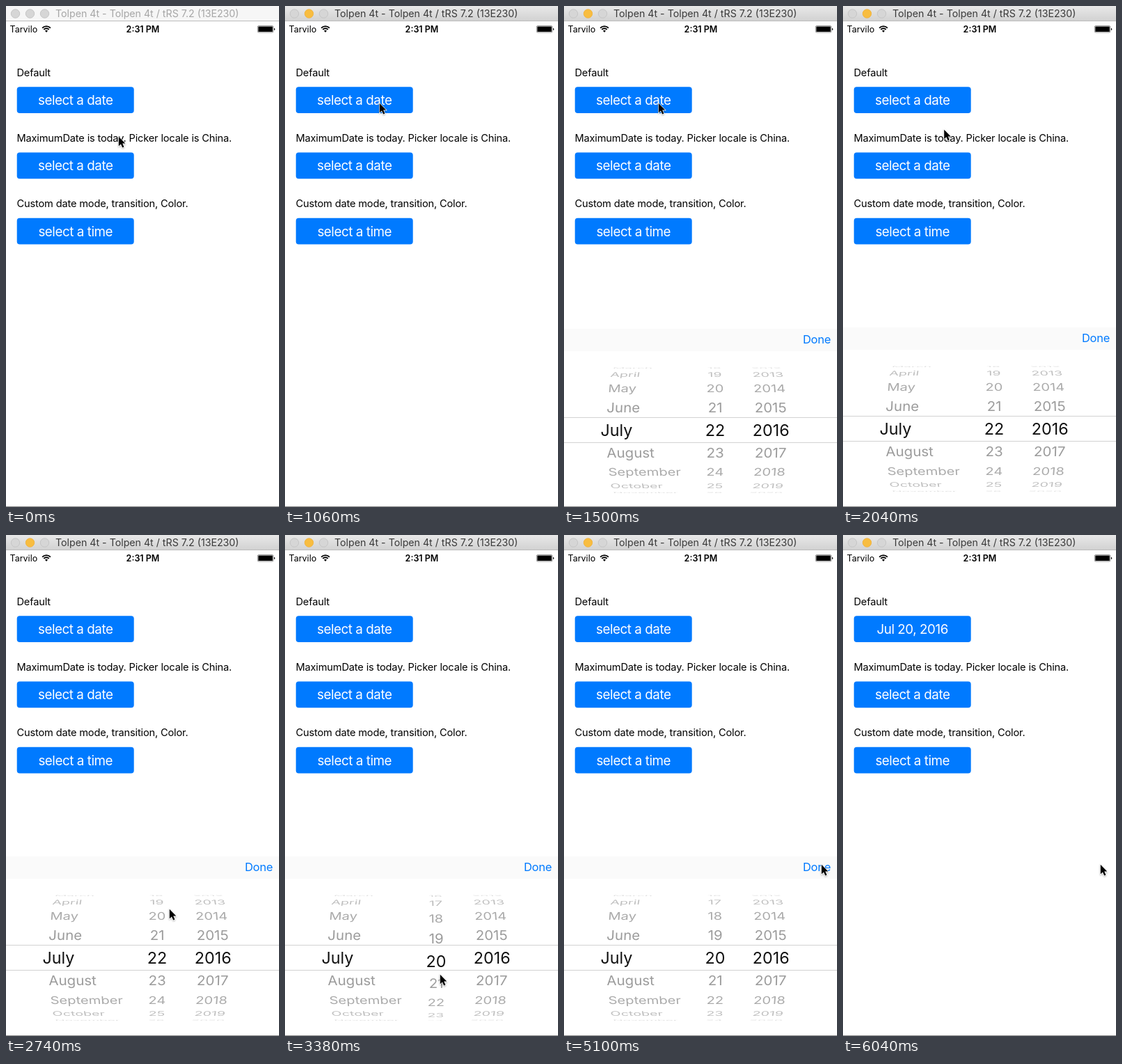
These frames come from a looping animation (392 by 720 pixels, 6060 ms). An HTML page:

```html
<!DOCTYPE html>
<html lang="en">
<head>
<meta charset="utf-8">
<title>Date picker demo</title>
<style>
  html, body { margin: 0; width: 100%; height: 100%; overflow: hidden; background: #fff; }
  svg { display: block; width: 392px; height: 720px; font-family: Inter, Roboto, "Liberation Sans", sans-serif; }
  .label { font-size: 14.6px; letter-spacing: -.16px; }
  .button rect { fill: #007aff; }
  .button text { fill: #fff; font-size: 18.8px; letter-spacing: -.45px; text-anchor: middle; }
  .status { font-size: 12.5px; }
  .dot { stroke-width: 1; fill: #d6d6d6; stroke: #c6c6c6; }
  #title { font-size: 14.2px; fill: #a6a6a6; }
  .active #title { fill: #3a3a3a; }
  #bar { fill: #f6f6f6; }
  .active #bar { fill: url(#barFill); }
  .active #minimize { fill: #f8bd40; stroke: #f0b543; }
  .rim { font-size: 20.6px; }
  .lens { font-size: 23.3px; fill: #111; }
</style>
</head>
<body>
<svg id="stage" viewBox="0 0 392 720">
  <defs>
    <linearGradient id="barFill" x2="0" y2="1">
      <stop offset="0" stop-color="#e8e8e8"/>
      <stop offset="1" stop-color="#d1d1d1"/>
    </linearGradient>
    <clipPath id="rimClip"><path d="M0 516H392V589.5H0zM0 625.5H392V700H0z"/></clipPath>
    <clipPath id="lensClip"><path d="M0 589.5H392V625.5H0z"/></clipPath>
    <filter id="shade" x="-50%" y="-50%" width="200%" height="200%">
      <feDropShadow dx="0" dy="1.2" stdDeviation="1" flood-opacity=".35"/>
    </filter>
  </defs>
  <rect width="392" height="720" fill="#fff"/>

  <g id="page"></g>

  <g id="picker">
    <rect y="462" width="392" height="258" fill="#fff"/>
    <rect y="462" width="392" height="32" fill="#fafafa"/>
    <text x="383" y="483.2" text-anchor="end" font-size="16.4" letter-spacing="-.2" fill="#007aff">Done</text>
    <g id="rim" class="rim" clip-path="url(#rimClip)"></g>
    <g id="lens" class="lens" clip-path="url(#lensClip)"></g>
    <path d="M0 589.5H392M0 625.5H392" stroke="#d2d2d2"/>
  </g>

  <g class="status">
    <text x="5.5" y="37.5">Tarvilo</text>
    <text x="196.5" y="37.5" text-anchor="middle" font-weight="600">2:31 PM</text>
    <g fill="none" stroke="#000" stroke-width="1.9">
      <path d="M52.1 31.6A8.2 8.2 0 0 1 63.9 31.6M54.3 33.9A5 5 0 0 1 61.7 33.9"/>
      <path d="M58 38L56 35.6A3 3 0 0 1 60 35.6z" fill="#000" stroke="none"/>
    </g>
    <rect x="361.3" y="28.5" width="22.5" height="9.5" rx="1.6" fill="none" stroke="#000" stroke-width=".6" opacity=".75"/>
    <rect x="362.3" y="29.5" width="20.5" height="7.5" rx=".6"/>
    <path d="M384.9 31.4a2 2 0 0 1 0 3.7z"/>
  </g>

  <rect id="bar" width="392" height="22"/>
  <path d="M0 21.5H392" stroke="#bcbcbc"/>
  <circle class="dot" cx="13.5" cy="11" r="6.2"/>
  <circle class="dot" id="minimize" cx="34.5" cy="11" r="6.2"/>
  <circle class="dot" cx="55.5" cy="11" r="6.2"/>
  <text id="title" x="71" y="16">Tolpen 4t - Tolpen 4t / tRS 7.2 (13E230)</text>
  <path d="M0 719.5H392" stroke="#8a8a8a"/>

  <g id="cursor">
    <path d="M0 0V15L3.5 11.8L6 17.4L8.5 16.3L6 10.9H10.6z" transform="translate(.8 .8) scale(.9)"
          stroke="#fff" stroke-width="1.4" paint-order="stroke" filter="url(#shade)"/>
  </g>
</svg>
<script>
const LOOP = 6060, FOCUS = 980, OPEN = 1120, CLOSE = 5380;
const MID_Y = 607.6, MID_X = 196, RADIUS = 90, STEP = 0.368, DEPTH = 1080;
const $ = id => document.getElementById(id);

function add(parent, tag, attrs, text) {
  const el = document.createElementNS('http://www.w3.org/2000/svg', tag);
  for (const k in attrs) el.setAttribute(k, attrs[k]);
  if (text !== undefined) el.textContent = text;
  parent.append(el);
  return el;
}

const buttons = [
  ['Default', 'select a date'],
  ['MaximumDate is today. Picker locale is China.', 'select a date'],
  ['Custom date mode, transition, Color.', 'select a time']
].map(([label, caption], i) => {
  const y = i * 94.2;
  add($('page'), 'text', { class: 'label', x: 15.5, y: 101 + y }, label);
  const g = add($('page'), 'g', { class: 'button' });
  add(g, 'rect', { x: 15.7, y: 116.3, width: 168, height: 37.8, rx: 4, transform: `translate(0 ${y})` });
  return add(g, 'text', { x: 99.7, y: 142.2 + y }, caption);
});

// A wheel holds each item twice: grey on the drum, dark in the magnified band.
function makeWheel(items, anchor, rimX, lensX, skewX) {
  const rows = items.map(text => ['rim', 'lens'].map(id =>
    add($(id), 'text', { y: '.36em', 'text-anchor': anchor }, text)));
  return pos => rows.forEach(([rim, lens], i) => {
    const a = (i - pos) * STEP;
    const shown = Math.abs(a) < 1.55 ? 'inline' : 'none';
    rim.style.display = lens.style.display = shown;
    if (shown === 'none') return;
    const sin = Math.sin(a), cos = Math.cos(a);
    const far = DEPTH + RADIUS * (1 - cos), scale = DEPTH / far;
    const skew = -(skewX - MID_X) * DEPTH * sin / (far * far);
    const x = MID_X + (rimX - MID_X) * scale;
    rim.setAttribute('transform', `matrix(${scale} 0 ${skew} ${cos} ${x} ${MID_Y + RADIUS * sin})`);
    rim.setAttribute('fill-opacity', 0.12 + 0.29 * cos);
    lens.setAttribute('transform', `translate(${lensX} ${MID_Y + RADIUS * sin * 1.08})`);
  });
}

const range = (from, to) => Array.from({ length: to - from + 1 }, (_, i) => from + i);
const months = 'March April May June July August September October November'.split(' ');
makeWheel(months, 'start', 60.6, 52.5, 95)(4);
makeWheel(range(2012, 2020), 'middle', 297.2, 297.2, 297)(4);
const turnDays = makeWheel(range(14, 28), 'middle', 217.3, 217, 217);

const cursorPath = [
  [0, 161, 187], [80, 161, 187], [760, 135, 139], [1900, 135, 139],
  [2640, 234, 537], [2780, 234, 537], [3080, 222, 560], [3130, 222, 560],
  [3380, 222, 631], [3560, 222, 633], [3860, 222, 633], [4220, 238, 606],
  [4400, 238, 606], [5000, 369, 473], [LOOP, 369, 473]
];
const dayPath = [[0, 22], [3130, 22], [3380, 19.85], [3560, 19.79], [3880, 20], [LOOP, 20]];

const ease = p => p * p * (3 - 2 * p);
function sample(path, t) {
  const i = Math.max(1, path.findIndex(k => k[0] > t));
  const [a, b] = [path[i - 1], path[i]];
  const p = ease((t - a[0]) / (b[0] - a[0]));
  return a.slice(1).map((v, n) => v + (b[n + 1] - v) * p);
}

// Share of a critically damped slide still to go.
function remaining(ms) {
  if (ms <= 0) return 1;
  const w = ms * 0.01826;
  return ms > 520 ? 0 : (1 + w) * Math.exp(-w);
}

function draw(t) {
  $('stage').classList.toggle('active', t >= FOCUS);
  buttons[0].textContent = t < CLOSE ? 'select a date' : 'Jul 20, 2016';
  const drop = t < CLOSE ? remaining(t - OPEN) : 1 - remaining(t - CLOSE);
  $('picker').setAttribute('transform', `translate(0 ${258 * drop})`);
  turnDays(sample(dayPath, t)[0] - 14);
  $('cursor').setAttribute('transform', `translate(${sample(cursorPath, t)})`);
}

const start = performance.now();
function tick() {
  draw((performance.now() - start) % LOOP);
  requestAnimationFrame(tick);
}
tick();
</script>
</body>
</html>
```
